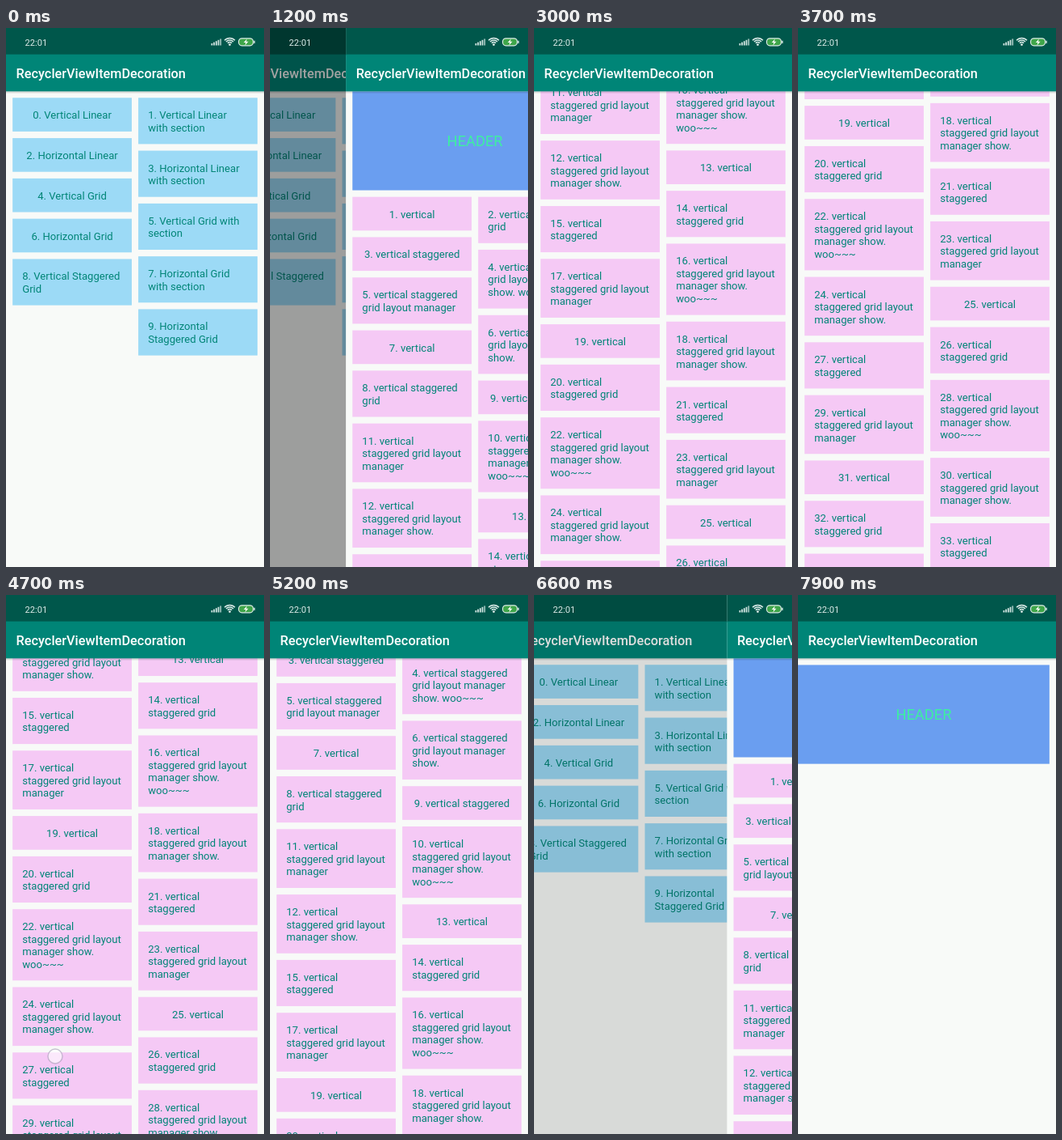
These frames come from a looping animation (320x666 px, 8 s). An HTML page:

```html
<!DOCTYPE html>
<html lang="en">
<head>
<meta charset="utf-8">
<title>RecyclerViewItemDecoration</title>
<style>
  html, body { margin: 0; width: 100%; height: 100%; overflow: hidden; background: #f8faf8; }
  svg { display: block; width: 100vw; height: 100vh; font-family: Roboto, "Noto Sans", sans-serif; }
</style>
</head>
<body>
<svg id="stage" viewBox="0 0 320 666">
  <defs>
    <linearGradient id="shade" x2="0" y2="1">
      <stop stop-opacity=".2"/><stop offset="1" stop-opacity="0"/>
    </linearGradient>
  </defs>
</svg>
<script>
const LOOP = 8000, W = 320, H = 666;
const BAR_TOP = 32.6, BAR_BOTTOM = 78.3;
const GAP = 8.15, CARD_W = 147.8, LINE = 15.5, CARD_PAD = 26.15;
const HEADER_H = 122.2, PARALLAX = 0.33, DIM = 0.52;
const stage = document.getElementById('stage');

function add(parent, tag, attrs = {}, text) {
  const el = document.createElementNS('http://www.w3.org/2000/svg', tag);
  for (const key in attrs) el.setAttribute(key, attrs[key]);
  if (text !== undefined) el.textContent = text;
  parent.appendChild(el);
  return el;
}
const rect = (parent, x, y, width, height, fill, extra) =>
  add(parent, 'rect', { x, y, width, height, fill, ...extra });

// A wide glyph such as the tilde counts double.
const measure = s => s.length + s.split('~').length - 1;
function wrap(text) {
  const lines = [];
  for (const word of text.split(' ')) {
    const joined = lines.length ? lines[lines.length - 1] + ' ' + word : word;
    if (lines.length && measure(joined) <= 21) lines[lines.length - 1] = joined;
    else lines.push(word);
  }
  // The number always stays beside its first word.
  return lines;
}

function card(parent, x, y, lines, fill) {
  const height = CARD_PAD + LINE * lines.length;
  rect(parent, x, y, CARD_W, height, fill);
  const single = lines.length === 1;
  lines.forEach((line, i) => add(parent, 'text', {
    x: single ? x + CARD_W / 2 : x + 12.1,
    y: y + 26 + i * LINE,
    'text-anchor': single ? 'middle' : 'start',
    'font-size': 13.1, fill: '#008577'
  }, line));
  return height;
}

// Each label goes to the shorter of the two columns.
function staggered(parent, labels, top, fill) {
  const ends = [top, top];
  for (const label of labels) {
    const col = ends[1] < ends[0] ? 1 : 0;
    const x = GAP + col * (CARD_W + GAP);
    ends[col] += card(parent, x, ends[col], wrap(label), fill) + GAP;
  }
}

function header(parent, x, y, width) {
  rect(parent, x, y, width, HEADER_H, '#6a9ef0');
  add(parent, 'text', {
    x: x + width / 2, y: y + 68, 'text-anchor': 'middle', 'font-size': 18.3, fill: '#3cf0a0'
  }, 'HEADER');
}

function page(fillContent) {
  const root = add(stage, 'g');
  rect(root, 0, 0, W, H, '#f8faf8');
  const content = add(root, 'g');
  fillContent(content);
  const overlay = add(root, 'g');
  rect(root, 0, BAR_BOTTOM, W, 3, 'url(#shade)');
  rect(root, 0, 0, W, BAR_TOP + 1, '#00574b');
  rect(root, 0, BAR_TOP, W, BAR_BOTTOM - BAR_TOP, '#008577');
  add(root, 'text', { x: 12.6, y: 62, 'font-size': 16.3, 'font-weight': 500, fill: '#fff' },
    'RecyclerViewItemDecoration');
  return { root, content, overlay };
}

const menuLabels = ['Linear', 'Grid'].flatMap(kind =>
  ['Vertical', 'Horizontal'].flatMap(dir => [`${dir} ${kind}`, `${dir} ${kind} with section`]))
  .concat('Vertical Staggered Grid', 'Horizontal Staggered Grid')
  .map((label, i) => `${i}. ${label}`);

const endings = [' staggered grid layout manager show.', '', ' staggered grid', ' staggered',
  ' staggered grid layout manager show. woo~~~', ' staggered grid layout manager'];
const listLabels = Array.from({ length: 50 }, (_, i) => `${i + 1}. vertical${endings[(i + 1) % 6]}`);

const menu = page(g => staggered(g, menuLabels, BAR_BOTTOM + GAP - 0.2, '#9cdaf6'));
const dim = rect(stage, 0, 0, W, H, '#000');
const list = page(g => {
  header(g, GAP, BAR_BOTTOM, W - 2 * GAP);
  staggered(g, listLabels, BAR_BOTTOM + HEADER_H + GAP, '#f5c9f5');
});
const sideways = page(g => header(g, 0, BAR_BOTTOM + GAP, W - GAP));
const glow = add(list.overlay, 'path', { fill: '#008577' });

// Status bar
const status = add(stage, 'g', { fill: '#dcebe8' });
add(status, 'text', { x: 23.6, y: 21.7, 'font-size': 11.1 }, '22:01');
for (let i = 0; i < 5; i++) {
  const h = 2.5 + i * 1.4;
  rect(status, 254.5 + i * 2.7, 21.5 - h, 1.8, h, '#dcebe8', { opacity: i < 4 ? 0.95 : 0.7 });
}
for (const r of [3.4, 6, 8.6]) {
  const d = r * 0.75;
  add(status, 'path', {
    d: `M${277.5 - d} ${21 - r * 0.66}A${r} ${r} 0 0 1 ${277.5 + d} ${21 - r * 0.66}`,
    fill: 'none', stroke: '#dcebe8', 'stroke-width': 1.5
  });
}
add(status, 'circle', { cx: 277.5, cy: 20.6, r: 1.4 });
rect(status, 288.6, 12.8, 18, 9, '#3fa64a', { rx: 4, stroke: '#dcebe8', 'stroke-width': 1.2 });
rect(status, 307.4, 15.5, 1.4, 3.6, '#dcebe8', { rx: 0.7 });
add(status, 'path', { d: 'M298.8 13.4l-4 4.6h2.6l-1 3.6 4.2-4.8h-2.6z', fill: '#fff' });

const dot = add(stage, 'circle', {
  r: 9, fill: '#fff', 'fill-opacity': 0.6, stroke: '#9a93ad', 'stroke-opacity': 0.55, 'stroke-width': 1.4
});

const clamp = v => Math.max(0, Math.min(1, v));
const easeOut = p => 1 - (1 - clamp(p)) ** 3;

// Smooth curve through points, flat at turning points.
function curve(points, t) {
  const last = points.length - 1;
  if (t <= points[0][0]) return points[0][1];
  if (t >= points[last][0]) return points[last][1];
  const rate = i => (points[i + 1][1] - points[i][1]) / (points[i + 1][0] - points[i][0]);
  const slope = i => {
    if (i === 0 || i === last) return 0;
    const a = rate(i - 1), b = rate(i);
    return a * b <= 0 ? 0 : 2 * a * b / (a + b);
  };
  const i = points.findIndex(p => p[0] > t) - 1;
  const [t0, v0] = points[i], [t1, v1] = points[i + 1];
  const d = t1 - t0, u = (t - t0) / d, w = 1 - u;
  return w * w * (1 + 2 * u) * v0 + u * u * (3 - 2 * u) * v1
    + d * u * w * (w * slope(i) - u * slope(i + 1));
}

const scrollPath = [[2000, 0], [2100, 20], [2200, 71], [2300, 128], [2500, 225], [2700, 310],
  [3000, 430], [3200, 475], [3400, 570], [3700, 700], [4000, 744], [4400, 744], [4700, 524],
  [4950, 340], [5200, 200], [5450, 0]];

// Down time, up time, then where the finger starts and ends.
const touches = [
  [760, 880, 75, 316, 75, 316],
  [1980, 2090, 246, 520, 248, 490],
  [3210, 3420, 246, 540, 250, 440],
  [4400, 4700, 54, 350, 61, 570],
  [5220, 5530, 58, 350, 68, 571],
  [7080, 7200, 238, 376, 238, 376]
];
const FADE = 100;

const shift = (el, x, y = 0) => el.setAttribute('transform', `translate(${x.toFixed(2)} ${y.toFixed(2)})`);

function place(p, shown) {
  shift(p.root, W * (1 - shown));
  p.root.setAttribute('visibility', shown > 0 ? 'visible' : 'hidden');
}

function render(t) {
  const listShown = t < 6380 ? easeOut((t - 1000) / 600) : 1 - easeOut((t - 6380) / 600);
  const sideShown = easeOut((t - 7300) / 550);
  const covered = Math.max(listShown, sideShown);
  place(list, listShown);
  place(sideways, sideShown);
  shift(menu.root, -W * PARALLAX * covered);
  dim.setAttribute('opacity', DIM * covered);
  shift(list.content, 0, -curve(scrollPath, t));

  const pull = curve([[5430, 0], [5580, 1], [5640, 1], [6150, 0]], t);
  const edge = BAR_BOTTOM + 15 * pull, mid = BAR_BOTTOM + 71 * pull;
  glow.setAttribute('d', `M0 ${BAR_BOTTOM}H${W}V${edge}Q${W / 2} ${mid} 0 ${edge}Z`);
  glow.setAttribute('opacity', 0.2 * pull);

  const touch = touches.find(([down, up]) => t >= down && t < up + FADE);
  dot.setAttribute('opacity', touch ? 1 - clamp((t - touch[1]) / FADE) : 0);
  if (touch) {
    const [down, up, x0, y0, x1, y1] = touch;
    const u = clamp((t - down) / (up - down));
    dot.setAttribute('cx', x0 + (x1 - x0) * u);
    dot.setAttribute('cy', y0 + (y1 - y0) * u);
  }
}

const start = performance.now();
function tick() {
  render((performance.now() - start) % LOOP);
  requestAnimationFrame(tick);
}
tick();
</script>
</body>
</html>
```
